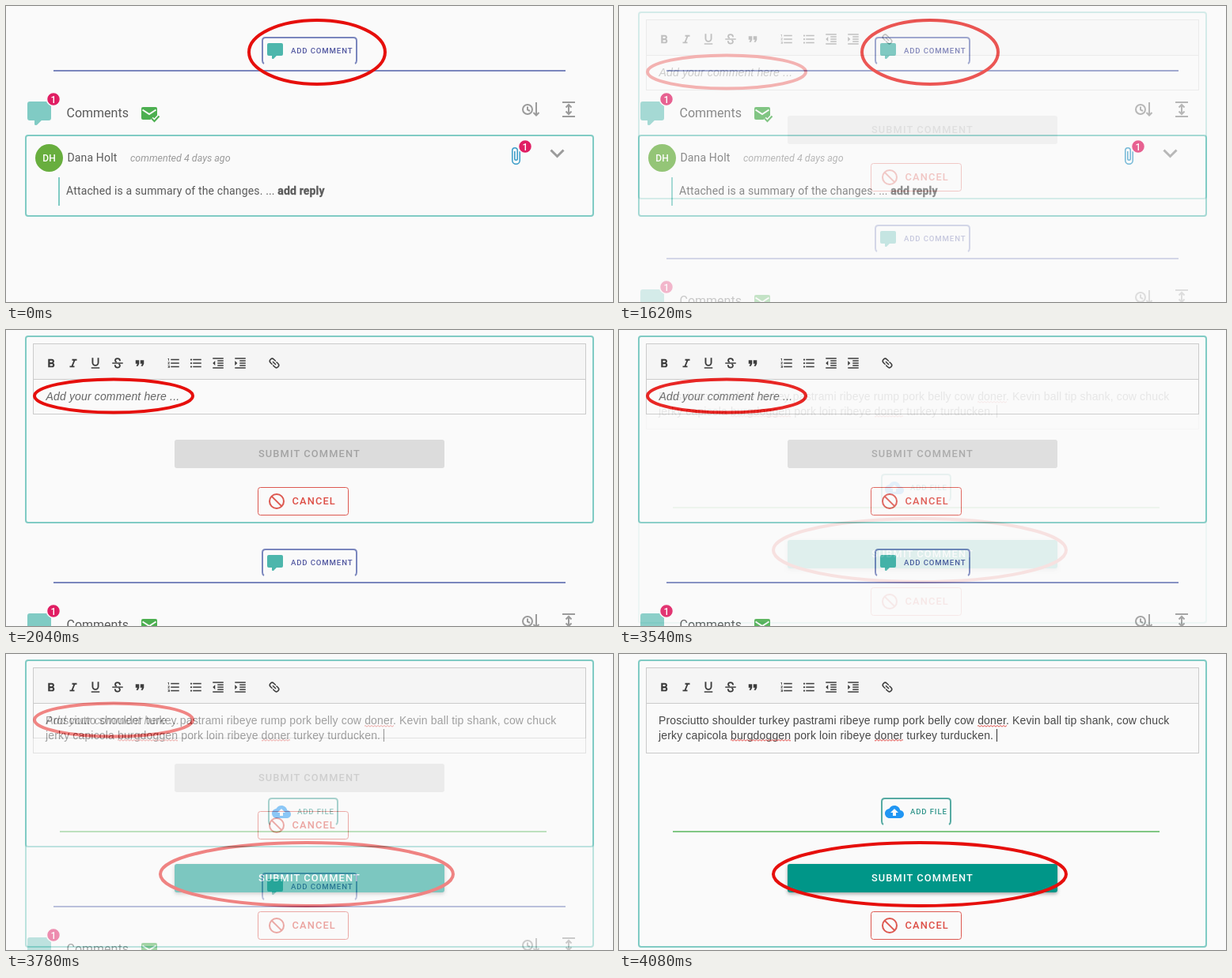
An HTML page that plays this animation: 767x375 px, repeating every 9080 ms.

```html
<!DOCTYPE html>
<html lang="en">
<head>
<meta charset="utf-8">
<title>Adding a comment</title>
<style>
  html, body { margin: 0; width: 100%; height: 100%; overflow: hidden; background: #fafafa; }
  svg { display: block; width: 767px; height: 375px; }
  text { font: 14px Roboto, sans-serif; letter-spacing: .15px; fill: #5a5a5a; white-space: pre; }
  .page { fill: #fafafa; }
  .title { font-size: 16px; letter-spacing: 0; }
  .note { font-size: 12.5px; font-style: italic; letter-spacing: 0; fill: #9a9a9a; }
  .strong { font-weight: 700; stroke: #5a5a5a; stroke-width: .3px; }
  .button { font-size: 12.8px; font-weight: 500; letter-spacing: .0892em; }
  .small { font-size: 9.6px; font-weight: 500; letter-spacing: .0892em; }
  .white { fill: #fff; font-weight: 500; text-anchor: middle; letter-spacing: 0; }
  .typed { font-family: "Liberation Sans", Arial, sans-serif; fill: #484848; }
  .line { fill: none; stroke-width: 2; }
  .teal { stroke: #80cbc4; }
  .indigo { stroke: #7a86bd; }
  .gray { stroke: #9b9b9b; }
  .ring { fill: none; stroke: #e60f0c; stroke-width: 4; }
  .box { fill: none; stroke: #cbcbcb; }
</style>
</head>
<body>
<svg viewBox="0 0 767 375">
  <defs>
    <path id="bubble" d="M9 22a1 1 0 0 1-1-1v-3H4a2 2 0 0 1-2-2V4a2 2 0 0 1 2-2h16a2 2 0 0 1 2 2v12a2 2 0 0 1-2 2h-6.1l-3.7 3.71c-.2.19-.45.29-.7.29z"/>

    <pattern id="wave" width="4" height="3" patternUnits="userSpaceOnUse">
      <path d="M-1 3L2 .5L5 3" fill="none" stroke="#e0504c"/>
    </pattern>

    <g id="badge">
      <circle r="8.5" fill="#e01e63" stroke="#fafafa" stroke-width="1.5"/>
      <text class="white" y="4.5" style="font-size:12px">1</text>
    </g>

    <g id="addComment">
      <path class="line indigo" d="M326 73Q324 72 324 69V44Q324 40 328 40H439Q443 40 443 44V69Q443 72 441 73M60 82H707"/>
      <use href="#bubble" x="328" y="45" fill="#4db6ac"/>
      <text class="small" x="360" y="60" style="fill:#5157a0">ADD COMMENT</text>
    </g>

    <g id="header">
      <use href="#bubble" transform="translate(24 118) scale(1.5)" fill="#80cbc4"/>
      <use href="#badge" x="60" y="118"/>
      <text class="title" x="76.5" y="141">Comments</text>
      <rect x="171" y="128" width="20" height="16" rx="2" fill="#4caf50"/>
      <path class="line" d="M172.500 131.500L181 137L189.500 131.500" stroke="#fafafa"/>
      <path class="line" d="M184 142.500L187.500 146L193.500 139.500" stroke="#fafafa" style="stroke-width:5"/>
      <path class="line" d="M184 142.500L187.500 146L193.500 139.500" stroke="#4caf50"/>
      <g class="line gray">
        <circle cx="659" cy="131" r="6"/>
        <path d="M659 127.500V131.500L662 133M670 122V138M666.500 135L670 138.500L673.500 135M703 122H719M703 140H719M711 126V136M707.500 128.500L711 125L714.500 128.500M707.500 133.500L711 137L714.500 133.500"/>
      </g>
    </g>

    <g id="toolbar">
      <rect x="34.500" y="17.500" width="698" height="45" fill="#f5f5f5" stroke="#cbcbcb"/>
      <g id="icons" fill="#3c3c3c"></g>
    </g>

    <g id="cancel">
      <rect x="318.500" y="199.500" width="114" height="35" rx="3" fill="none" stroke="#dd5850"/>
      <g class="line" stroke="#dd5850">
        <circle cx="342" cy="217" r="9"/>
        <path d="M335.600 210.600L348.400 223.400"/>
      </g>
      <text class="button" x="361.500" y="221" style="fill:#dd4f47">CANCEL</text>
    </g>
  </defs>

  <g>
    <rect class="page" width="767" height="375"/>
    <use href="#addComment"/>
    <use href="#header"/>
    <rect class="line teal" x="25" y="164" width="717" height="102" rx="3"/>
    <circle cx="54.500" cy="192.500" r="17.500" fill="#68ae3e"/>
    <text class="white" x="54.500" y="197" style="font-size:12px">DH</text>
    <text x="77.500" y="197">Dana Holt</text>
    <text class="note" x="157" y="197">commented 4 days ago</text>
    <path transform="translate(632 178)" fill="#3a9cc8" d="M16.500 6v11.500a4 4 0 0 1-8 0V5a2.500 2.500 0 0 1 5 0v10.500a1 1 0 0 1-2 0V6H10v9.500a2.500 2.500 0 0 0 5 0V5a4 4 0 0 0-8 0v12.500a5.500 5.500 0 0 0 11 0V6z"/>
    <use href="#badge" x="656" y="178"/>
    <path class="line gray" d="M688.500 182.500L696.500 190.500L704.500 182.500" style="stroke-width:3"/>
    <path class="line teal" d="M67 217V253"/>
    <text x="76" y="239">Attached is a summary of the changes. ... <tspan class="strong">add reply</tspan></text>
    <ellipse class="ring" cx="393" cy="58.500" rx="86" ry="40.500"/>
  </g>

  <g id="emptyForm">
    <rect class="page" width="767" height="375"/>
    <rect class="line teal" x="25" y="8" width="717" height="236" rx="3"/>
    <use href="#toolbar"/>
    <rect class="box" x="34.500" y="62.500" width="698" height="44"/>
    <text class="typed" x="50.500" y="89" font-style="italic" style="font-style:italic;fill:#666">Add your comment here ...</text>
    <rect x="213" y="139" width="341" height="36" rx="3" fill="#dcdcdc"/>
    <text class="button" x="319" y="161" style="fill:#a3a3a3">SUBMIT COMMENT</text>
    <use href="#cancel"/>
    <use href="#addComment" y="238"/>
    <use href="#header" y="238"/>
    <ellipse class="ring" cx="136" cy="83.500" rx="100" ry="21"/>
  </g>

  <g id="filledForm">
    <rect class="page" width="767" height="375"/>
    <rect class="line teal" x="25" y="8" width="717" height="363" rx="3"/>
    <use href="#toolbar"/>
    <rect class="box" x="34.500" y="62.500" width="698" height="63"/>
    <text class="typed" x="50" y="89">Prosciutto shoulder turkey pastrami ribeye rump pork belly cow doner. Kevin ball tip shank, cow chuck</text>
    <text class="typed" x="50" y="108">jerky capicola burgdoggen pork loin ribeye doner turkey turducken.</text>
    <g fill="url(#wave)">
      <rect x="453" y="90" width="37" height="3"/>
      <rect x="141" y="108" width="76" height="3"/>
      <rect x="323" y="108" width="36" height="3"/>
    </g>
    <path d="M477.500 95V111" stroke="#333"/>
    <path class="line" stroke="#56aaa2" d="M334 216Q332 215 332 212V187Q332 183 336 183H415Q419 183 419 187V212Q419 215 417 216"/>
    <path class="line" stroke="#81c784" d="M68 225H683"/>
    <path transform="translate(336 188)" fill="#2196f3" d="M19.350 10.040C18.670 6.590 15.640 4 12 4 9.110 4 6.600 5.640 5.350 8.040 2.340 8.360 0 10.910 0 14c0 3.310 2.690 6 6 6h13c2.760 0 5-2.240 5-5 0-2.640-2.050-4.780-4.650-4.960zM14 13v4h-4v-4H7l5-5 5 5z"/>
    <text class="small" x="368" y="203" style="fill:#2f948a">ADD FILE</text>
    <rect x="213" y="266" width="341" height="36" rx="3" fill="#009688" style="filter:drop-shadow(0 2px 2px #0005)"/>
    <text class="button" x="319" y="288" style="fill:#fff">SUBMIT COMMENT</text>
    <use href="#cancel" y="127"/>
    <ellipse class="ring" cx="380" cy="279" rx="185" ry="40"/>
  </g>
</svg>
<script>
  const byId = id => document.getElementById(id);
  const stroke = (d, width = 2) =>
    `<path d="${d}" fill="none" stroke="#3c3c3c" stroke-width="${width}" stroke-linecap="round"/>`;
  const fill = d => `<path d="${d}"/>`;
  const indentLines = "M3 3h18v2H3zM11 7h10v2H11zM11 11h10v2H11zM11 15h10v2H11zM3 19h18v2H3z";
  const listLines = "M7 5h14v2H7zM7 11h14v2H7zM7 17h14v2H7z";

  // Toolbar icons on a 24 unit grid: [centre x, markup]
  const icons = [
    [57, fill("M15.6 11.8c1-.7 1.65-1.8 1.65-2.8 0-2.26-1.75-4-4-4H7v14h7c2.1 0 3.75-1.7 3.75-3.8 0-1.5-.9-2.8-2.15-3.4zM10 7.5h3a1.5 1.5 0 0 1 0 3h-3zM13.5 16.500H10v-3h3.500a1.500 1.500 0 0 1 0 3z")],
    [85, fill("M10 5v2.500h2.500l-3.600 9H6V19h8v-2.500h-2.500l3.600-9H18V5z")],
    [113, fill("M12 17c3.310 0 6-2.690 6-6V3h-2.500v8a3.500 3.500 0 0 1-7 0V3H6v8c0 3.310 2.690 6 6 6zM5 19v2h14v-2z")],
    [141, stroke("M16 7.500C15.500 3 8 3 8 7.500C8 8.500 8.500 9.200 9.500 9.800M14.800 14C17 16 16 19.500 12 19.500C9.500 19.500 8 18 7.800 15.800", 2.4) + fill("M3 11h18v2H3z")],
    [169, fill("M6 17h3l2-4V7H5v6h3zM14 17h3l2-4V7h-6v6h3z")],
    [212, fill("M2 17h2v.5H3v1h1v.5H2v1h3v-4H2zM3 8h1V4H2v1h1zM2 11h1.800L2 13.100v.9h3v-1H3.200L5 10.900V10H2z" + listLines)],
    [240, stroke("M4 6h.01M4 12h.01M4 18h.01", 3) + fill(listLines)],
    [268, fill("M3 12l4 4V8z" + indentLines)],
    [296, fill("M3 8v8l4-4z" + indentLines)],
    [339, `<g transform="rotate(45 12 12)">${stroke("M10.500 8H7a4 4 0 0 0 0 8h3.500M13.500 8H17a4 4 0 0 1 0 8h-3.500M9 12h6")}</g>`],
  ];
  byId("icons").innerHTML = icons.map(([x, markup]) =>
    `<g transform="translate(${x - 9} 33) scale(.75)">${markup}</g>`).join("");

  const LOOP = 9080, STEP = 60, STEPS = 10;
  const fade = elapsed => Math.max(0, Math.min(1, (Math.floor(elapsed / STEP) + 1) / STEPS));

  function draw() {
    const time = performance.now() % LOOP;
    byId("emptyForm").style.opacity = fade(time - 1500);
    byId("filledForm").style.opacity = fade(time - 3540);
    requestAnimationFrame(draw);
  }
  draw();
</script>
</body>
</html>
```
